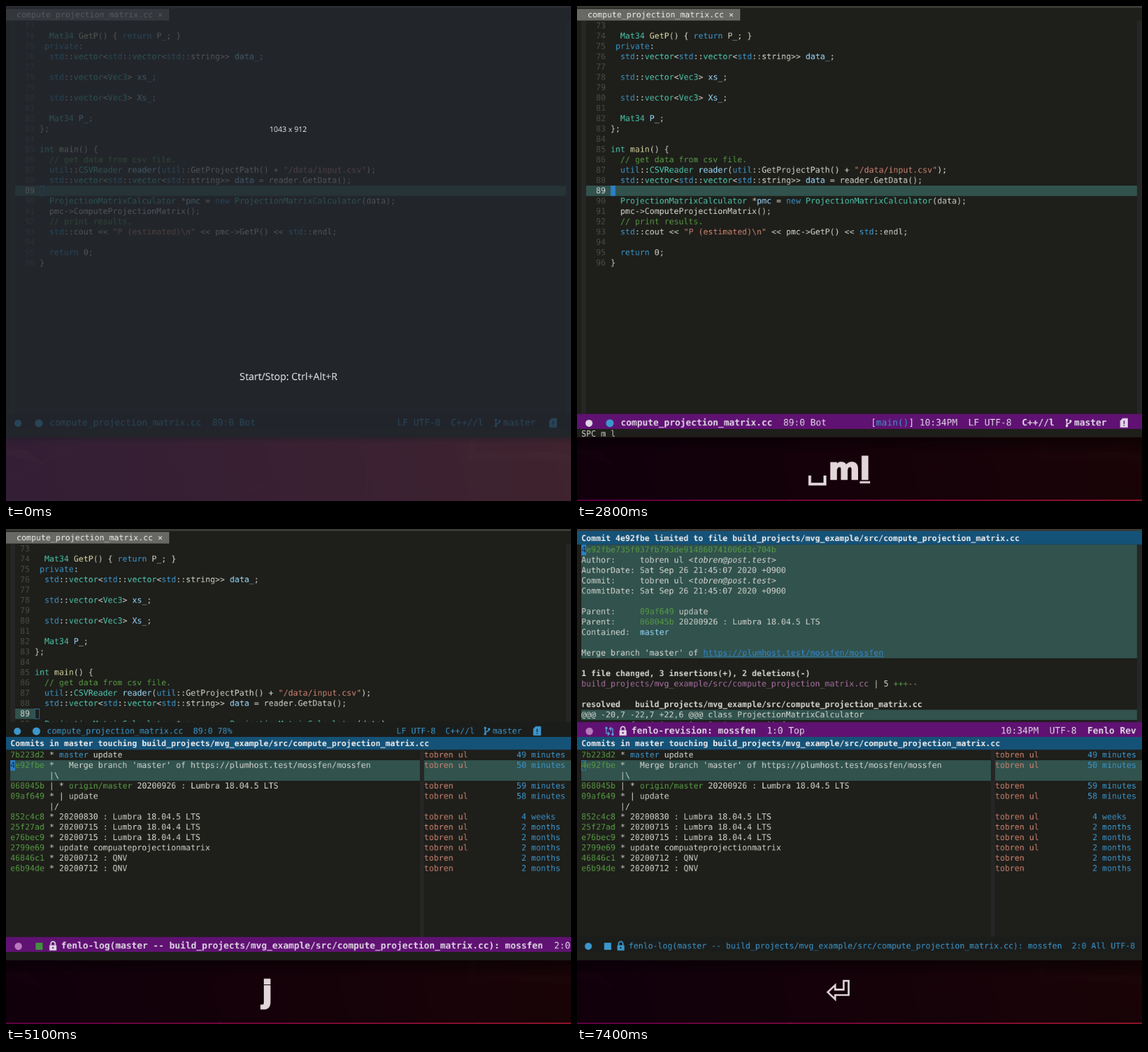
Write an HTML page with a canvas that moves like this. It is 800 px wide and 700 px high and loops after 8000 ms.

```html
<!DOCTYPE html>
<html lang="en">
<head>
<meta charset="utf-8">
<title>Editor history session</title>
<style>
html, body { margin: 0; width: 100%; height: 100%; overflow: hidden; background: #1e1e1a; }
canvas { display: block; width: 800px; height: 700px; }
</style>
</head>
<body>
<canvas id="stage" width="1043" height="912"></canvas>
<script>
// The screen is 1043 x 912 and shown reduced; coordinates are stage pixels.
const ctx = document.getElementById('stage').getContext('2d');
ctx.scale(1043 / 800, 912 / 700);
ctx.textRendering = 'geometricPrecision';

const LOOP = 8000, LINE = 19 * 700 / 912, ASCENT = 14 * 700 / 912;
const SMALL = 11.466, LARGE = 12.74;          // text sizes
const ADVANCE = 0.60205;                      // monospace width per em
const EDGE = 6.14;                            // left side of the text area
const CODE_TOP = 20.72, LOG_TOP = 312.39, COMMIT_TOP = 22.26;
const BG = '#1e1e1a', BAR = '#1b1d1b', FRINGE = '#252625', TEAL = '#31524d';
const PURPLE = '#5f1272', HEADER = '#155278', CURSOR = '#2b80c6';
const INK = {
  w: '#d6d6d0', b: '#3c97cd', t: '#4ec9b0', y: '#dcdcaa', c: '#9cdcfe', s: '#ce8573',
  g: '#579b45', n: '#4a4d4b', p: '#a872a4', l: '#3387cf', h: '#ececec', m: '#e0d6e5', k: '#1b2a3a'
};
const FILE = 'compute_projection_matrix.cc';
const PATH = 'build_projects/mvg_example/src/' + FILE;
const REPO = 'https://plumhost.test/mossfen/mossfen';
const LOG_NAME = `fenlo-log(master -- ${PATH}): mossfen`;

const VEC = '^bstd^w::^tvector^w<';
const TABLE = `${VEC}${VEC}^bstd^w::string>> `;
const CODE = [                                // starts at line 73
  '', '  ^tMat34 ^yGetP^w() { ^breturn ^wP_; }', ' ^bprivate^w:', `  ${TABLE}^cdata_^w;`, '',
  `  ${VEC}^tVec3^w> ^cxs_^w;`, '', `  ${VEC}^tVec3^w> ^cXs_^w;`, '', '  ^tMat34 ^cP_^w;', '};', '',
  '^tint ^ymain^w() {', '  ^g// get data from csv file.',
  '  ^butil^w::^tCSVReader ^creader^w(^butil^w::GetProjectPath() + ^s"/data/input.csv"^w);',
  `  ${TABLE}^cdata ^w= reader.GetData();`, '',
  '  ^tProjectionMatrixCalculator ^w*^cpmc ^w= ^bnew ^tProjectionMatrixCalculator^w(data);',
  '  pmc->ComputeProjectionMatrix();', '  ^g// print results.',
  '  ^bstd^w::cout << ^s"P (estimated)\\n"^w << pmc->GetP() << ^bstd^w::endl;', '',
  '  ^breturn ^w0;', '}'
];
const LOG = [                                 // commit, author, age
  ['^g7b223d2 ^w* ^bmaster ^wupdate', 'tobren ul', '49 minutes'],
  [`^g4e92fbe ^w*   Merge branch 'master' of ${REPO}`, 'tobren ul', '50 minutes'],
  ['        |\\', '', ''],
  ['^g068045b ^w| * ^gorigin/master ^w20200926 : Lumbra 18.04.5 LTS', 'tobren', '59 minutes'],
  ['^g09af649 ^w* | update', 'tobren ul', '58 minutes'],
  ['        |/', '', ''],
  ['^g852c4c8 ^w* 20200830 : Lumbra 18.04.5 LTS', 'tobren ul', ' 4 weeks'],
  ['^g25f27ad ^w* 20200715 : Lumbra 18.04.4 LTS', 'tobren ul', ' 2 months'],
  ['^ge76bec9 ^w* 20200715 : Lumbra 18.04.4 LTS', 'tobren ul', ' 2 months'],
  ['^g2799e69 ^w* update compuateprojectionmatrix', 'tobren ul', ' 2 months'],
  ['^g46846c1 ^w* 20200712 : QNV', 'tobren', ' 2 months'],
  ['^ge6b94de ^w* 20200712 : QNV', 'tobren', ' 2 months']
];
const MAIL = '^i<tobren@post.test>^r';
const DATE = 'Sat Sep 26 21:45:07 2020 +0900';
const COMMIT = [
  '^g4e92fbe735f037fb793de914860741006d3c704b',
  'Author:     tobren ul ' + MAIL, 'AuthorDate: ' + DATE,
  'Commit:     tobren ul ' + MAIL, 'CommitDate: ' + DATE, '',
  'Parent:     ^g09af649 ^wupdate', 'Parent:     ^g068045b ^w20200926 : Lumbra 18.04.5 LTS',
  'Contained:  ^cmaster', '', `Merge branch 'master' of ^l${REPO}`, '',
  '^f1 file changed, 3 insertions(+), 2 deletions(-)',
  `^p${PATH} ^w| 5 ^g+++^s--`, '', `^fresolved   ${PATH}`,
  '@@@ -20,7 -22,7 +22,6 @@@ class ProjectionMatrixCalculator',
  '          for (size_t i = 0; i < n; ++i) {'
];
// start, end, pressed keys, end of the underline below the newest key
const KEYS = [
  [1600, 2300, '␣', 1800], [2300, 2800, '␣m', 2400], [2800, 4400, '␣ml', 3200],
  [5000, 6400, 'j', 5100], [7100, 8000, '⏎', 7300]
];

function rect(x, y, w, h, color) {
  ctx.fillStyle = color;
  ctx.fillRect(x, y, w, h);
}

function dot(x, y, r, color) {
  ctx.fillStyle = color;
  ctx.beginPath();
  ctx.arc(x, y, r, 0, 7);
  ctx.fill();
}

function stroke(path, color, width, x = 0, y = 0) {
  ctx.save();
  ctx.translate(x, y);
  ctx.strokeStyle = color;
  ctx.lineWidth = width;
  ctx.stroke(new Path2D(path));
  ctx.restore();
}

// Marks: ^f bold, ^i italic, ^r regular, any other ^letter picks an ink.
function text(str, x, y, size = SMALL, ink = 'w', style = '') {
  let col = 0;
  const cell = size * ADVANCE;
  str.split(/(\^[a-z])/).forEach(part => {
    if (/^\^[a-z]$/.test(part)) {
      const mark = part[1];
      if (mark === 'f') style = 'bold';
      else if (mark === 'i') style = 'italic';
      else if (mark === 'r') style = '';
      else ink = mark;
    } else if (part) {
      ctx.font = `${style} ${size}px "DejaVu Sans Mono", monospace`;
      ctx.fillStyle = INK[ink];
      ctx.fillText(part, x + col * cell, y);
      if (ink === 'l') rect(x + col * cell, y + 1.3, part.length * cell, 0.9, INK.l);
      col += part.length;
    }
  });
}

function cursor(x, y, filled, char = '') {
  if (filled) {
    rect(x, y, 6.9, LINE, CURSOR);
    text(char, x, y + ASCENT, SMALL, 'k');
  } else {
    ctx.strokeStyle = CURSOR;
    ctx.lineWidth = 0.8;
    ctx.strokeRect(x + 0.4, y + 0.4, 6.1, LINE - 0.8);
  }
}

function branch(x, y, color) {
  stroke('M-2.5 -3V3M2.8 -1.5C2.8 1.5 -2.5 0 -2.5 3', color, 1.5, x, y);
  [[-2.5, -4], [-2.5, 4.2], [2.8, -2.5]].forEach(([dx, dy]) => dot(x + dx, y + dy, 1.7, color));
}

function compare(x, y, color) {
  stroke('M-4.5 -3V4M4.5 4V-3H0M2.5 -5.5L0 -3L2.5 -.5M-4.5 4H0M-2.5 1.5L0 4L-2.5 6.5', color, 1.4, x, y);
  dot(x - 4.5, y - 4, 1.7, color);
  dot(x + 4.5, y + 5, 1.7, color);
}

function lock(x, y, color, hole) {
  rect(x - 5, y - 1, 10, 7.5, color);
  stroke('M-3 -1V-3A3 3 0 0 1 3 -3V-1', color, 1.7, x, y);
  dot(x, y + 2.7, 1.2, hole);
}

function note(x, y, color, hole) {
  ctx.fillStyle = color;
  ctx.fill(new Path2D(`M${x - 2} ${y - 6.5}H${x + 5.5}V${y + 6.5}H${x - 5.5}V${y - 3}Z`));
  rect(x - 0.7, y - 3, 1.5, 4.5, hole);
  rect(x - 0.7, y + 2.7, 1.5, 1.5, hole);
}

function wallpaper(focused) {
  const g = ctx.createLinearGradient(0, 700, 760, 500);
  g.addColorStop(0, '#620044');
  g.addColorStop(0.5, '#7b0938');
  g.addColorStop(1, '#93152a');
  rect(0, 610, 800, 90, g);
  ctx.fillStyle = 'rgba(255,110,130,.09)';
  ctx.fill(new Path2D('M0 626L32 628L54 650L0 634ZM656 612H666L664 633Q735 625 800 634V645Q730 636 653 644Z'));
  stroke('M513 612L510 700M0 672Q60 640 120 612M660 644Q655 675 670 700M300 700Q420 655 560 650', 'rgba(255,120,140,.05)', 2);
  const depth = focused ? 22 : 9;
  const shade = ctx.createLinearGradient(0, 610, 0, 610 + depth);
  shade.addColorStop(0, 'rgba(0,0,0,.42)');
  shade.addColorStop(1, 'rgba(0,0,0,0)');
  rect(0, 610, 800, depth, shade);
}

function tabBar() {
  rect(0, 0, 800, 3, '#3c3b36');
  rect(0, 3, 800, 17.5, BG);
  rect(0, 4, 231, 16.5, '#686865');
  text(FILE + ' ×', 15, 16.3, SMALL, 'h');
}

function codePane(split, focused) {
  const left = split ? 40.65 : 47.55, current = CODE_TOP + 16 * LINE;
  rect(6, 20, 7, 557, FRINGE);
  rect(793, 20, 7, 557, FRINGE);
  rect(13, current, split ? 27.6 : 780, LINE, TEAL);
  CODE.forEach((line, i) => {
    const base = CODE_TOP + i * LINE + ASCENT, n = 73 + i;
    text('' + n, left - 3 * SMALL * ADVANCE, base, SMALL, n === 89 ? 'w' : 'n');
    text(line, left, base);
  });
  cursor(left, current, focused && !split);
  tabBar();
}

function fileBar(y, x, focused, split) {
  const size = split ? SMALL : LARGE, ink = focused ? 'm' : 'b', color = INK[ink];
  const bg = focused ? PURPLE : BAR, base = y + 4.3, bold = focused ? 'bold' : '';
  rect(0, y - 12, 800, 21, bg);
  dot(x, y + 1, 5, color);
  dot(split ? 43 : 46.5, y + 1, 5.5, INK.b);
  const [name, pos, enc, mode, br, end] = split ? [58, 265, 553, 622, 689, 752] : [62, 292, 554, 630, 704, 774.5];
  text(FILE, name, base, size, ink, bold);
  text(split ? '89:0 78%' : '89:0 Bot', pos, base, size, ink);
  if (focused) text('[^bmain()^m] 10:34PM', 416, base, size, ink);
  text('LF UTF-8', enc, base, size, ink);
  text('C++//l', mode, base, size, ink, bold);
  branch(br - 8, y + 0.5, color);
  text('master', br, base, size, ink, bold);
  note(end, y + 0.5, color, bg);
}

function logPane(row, focused) {
  rect(0, 294, 800, 316, BG);
  rect(0, 294, 800, 18, HEADER);
  text('Commits in master touching ' + PATH, EDGE, 307, SMALL, 'h', 'bold');
  rect(586, 312, 6, 265, FRINGE);
  const top = LOG_TOP + row * LINE, height = LINE * (row ? 2 : 1);
  rect(EDGE, top, 586 - EDGE, height, TEAL);
  rect(592, top, 208, height, TEAL);
  LOG.forEach(([commit, author, age], i) => {
    const base = LOG_TOP + i * LINE + ASCENT;
    text(commit, EDGE, base);
    text(author, 592, base, SMALL, 's');
    text(age, 723, base, SMALL, 'b');
  });
  cursor(EDGE, top, focused, row ? '4' : '7');
  if (focused) {
    rect(0, 577, 800, 21, PURPLE);
    dot(17.5, 590, 5.2, '#b878bd');
    rect(42, 585, 10, 10, '#43903f');
    lock(66.5, 589.5, INK.m, PURPLE);
    text(`^f${LOG_NAME}^r  ${row + 1}:0`, 78, 593.4, LARGE, 'm');
  } else {
    rect(0, 577, 800, 21, BAR);
    dot(16, 590, 5, INK.b);
    rect(38.5, 585, 10, 10, INK.b);
    lock(62, 589.5, INK.b, BAR);
    text(LOG_NAME + '  2:0 All UTF-8', 73, 593.2, SMALL, 'b');
  }
}

function commitPane() {
  rect(0, 0, 800, 294, BG);
  rect(0, 0, 800, 3, '#3c3b36');
  rect(793, 22, 7, 251, FRINGE);
  rect(0, 3, 800, 19, HEADER);
  text(`Commit 4e92fbe limited to file ${PATH}`, EDGE, 17, SMALL, 'h', 'bold');
  rect(EDGE, COMMIT_TOP, 793 - EDGE, LINE * 11, TEAL);
  rect(EDGE, COMMIT_TOP + LINE * 16, 793 - EDGE, LINE, TEAL);
  COMMIT.forEach((line, i) => text(line, EDGE, COMMIT_TOP + i * LINE + ASCENT));
  cursor(EDGE, COMMIT_TOP, true, '4');
  rect(0, 273, 800, 21, PURPLE);
  dot(17.5, 286, 5.2, '#b878bd');
  compare(46, 285.5, '#58a5d8');
  lock(65, 285.5, INK.m, PURPLE);
  text('^ffenlo-revision: mossfen^r  1:0 Top', 77, 289.4, LARGE, 'm');
  text('10:34PM  UTF-8  ^fFenlo Rev', 600, 289.4, LARGE, 'm');
}

function keyOverlay(t) {
  const shown = KEYS.find(([from, to]) => t >= from && t < to);
  if (!shown) return;
  const [, , keys, settled] = shown, color = '#e2d6da';
  rect(0, 610, 800, 88, 'rgba(0,0,0,.83)');
  ctx.font = 'bold 42.6px "DejaVu Sans", sans-serif';
  const widths = [...keys].map(k => k === '␣' ? 31 : k === '⏎' ? 38 : ctx.measureText(k).width);
  let x = 370 - widths.reduce((a, b) => a + b) / 2;
  [...keys].forEach((key, i) => {
    if (key === '␣') stroke('M4.6 664V676H26V664', color, 4, x);
    else if (key === '⏎') stroke('M26.5 639H33.5V659H14.5V665L4 655L14.5 645V651.5H26.5Z', color, 2.6, x);
    else {
      ctx.fillStyle = ctx.strokeStyle = color;
      ctx.lineWidth = 2;
      ctx.fillText(key, x, 669);
      ctx.strokeText(key, x, 669);
    }
    if (i === keys.length - 1 && t < settled) rect(x, 672, widths[i], 3, color);
    x += widths[i];
  });
}

function recorder() {
  rect(0, 0, 800, 700, 'rgba(35,40,48,.75)');
  ctx.fillStyle = '#f0f0f0';
  ctx.textAlign = 'center';
  ctx.font = '10.5px "Open Sans", sans-serif';
  ctx.fillText('1043 x 912', 399.5, 178);
  ctx.font = '14px "Open Sans", sans-serif';
  ctx.fillText('Start/Stop: Ctrl+Alt+R', 400, 529);
  ctx.textAlign = 'left';
}

function draw(t) {
  const focused = t >= 700, split = t >= 3200, opened = t >= 7400;
  rect(0, 0, 800, 700, BG);
  wallpaper(focused);
  if (opened) commitPane();
  else codePane(split, focused);
  if (split) {
    if (!opened) fileBar(285, 16, false, true);
    logPane(t >= 5000 ? 1 : 0, !opened);
  } else {
    fileBar(589, 17, focused, false);
  }
  const echo = t < 2000 ? '' : t < 2300 ? 'SPC-' : t < 2800 ? 'SPC m-' : t < 5000 ? 'SPC m l' : '';
  text(echo, EDGE, 608.3);
  keyOverlay(t);
  if (t < 100) recorder();
}

const start = performance.now();
function tick() {
  draw((performance.now() - start) % LOOP);
  requestAnimationFrame(tick);
}
tick();
</script>
</body>
</html>
```
